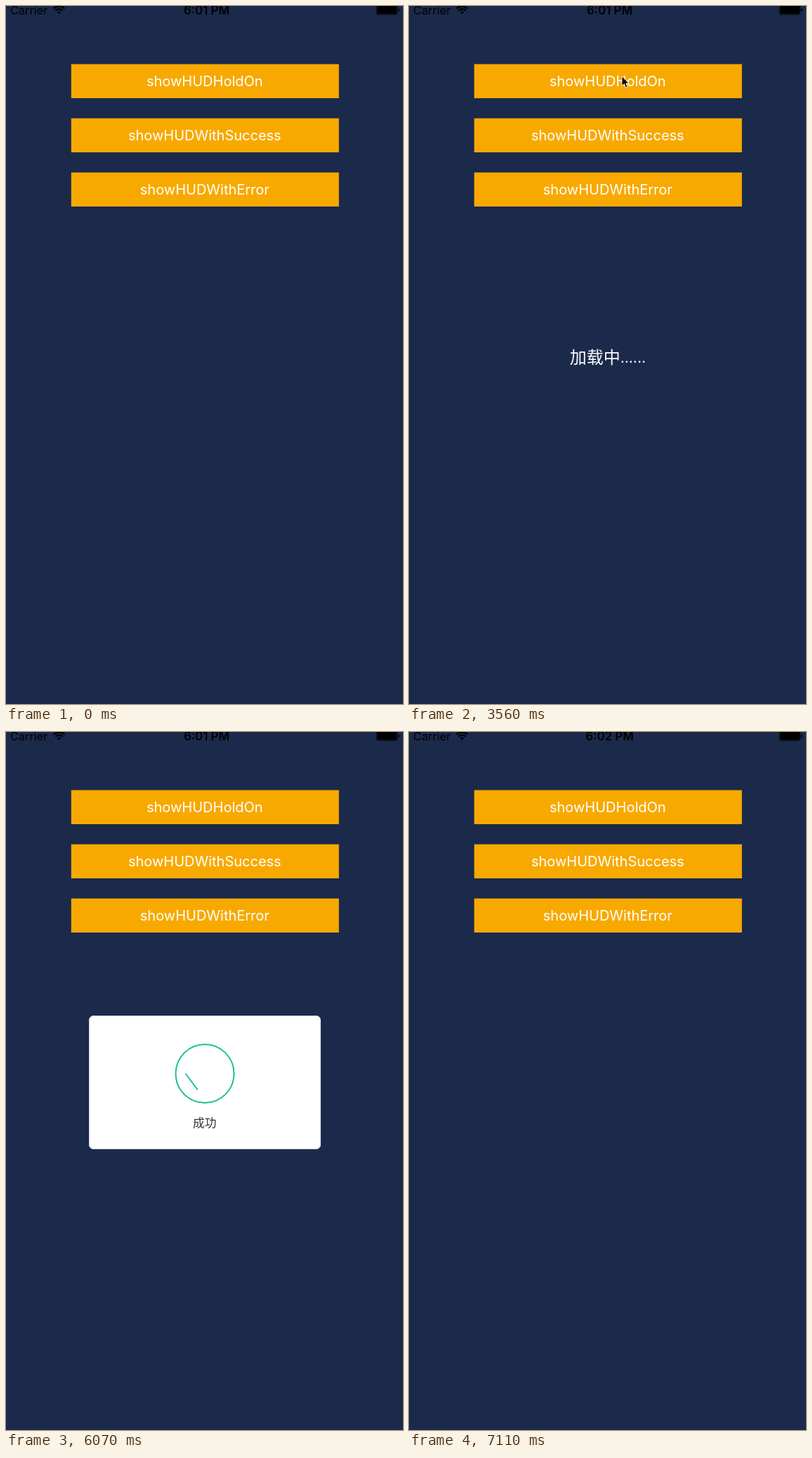
An HTML page for the animation above (7990 ms loop, 565 by 992 pixels).

```html
<!DOCTYPE html>
<html lang="en">
<head>
<meta charset="utf-8">
<title>HUD demo</title>
<style>
  html, body { margin: 0; height: 100%; overflow: hidden; background: #1b294b; }
  svg { display: block; width: 100vw; height: 100vh; }
  text { font-family: Inter, "Open Sans", sans-serif; }
  .cjk { font-family: "Noto Sans CJK SC", "Noto Sans CJK", sans-serif; }
  .button rect { fill: #f8a900; width: 381px; height: 48.4px; }
  .button text { fill: #fff; font-size: 20px; text-anchor: middle; }
  .status { font-size: 16.3px; }
  .line { fill: none; stroke: #1bbf98; stroke-width: 2; }
  #clock { font-size: 16.9px; font-weight: 600; text-anchor: middle; }
  #loading { fill: #fff; font-size: 24px; font-weight: 300; }
  #loading .dots { font-family: Inter, sans-serif; font-size: 21px; font-weight: 400; }
  #card .caption { fill: #333; font-size: 16.7px; font-weight: 500; text-anchor: middle; }
</style>
</head>
<body>
<svg viewBox="0 0 565 992" preserveAspectRatio="none">
  <text class="status" x="6" y="12">Carrier</text>
  <g fill="none" stroke="#000" stroke-width="2.3">
    <path d="M67.6 3.6a11.2 11.2 0 0 1 15.8 0"/>
    <path d="M70.4 6.5a7.2 7.2 0 0 1 10.2 0"/>
    <path d="M75.5 11.6l-2.8-2.8a4 4 0 0 1 5.6 0z" fill="#000" stroke="none"/>
  </g>
  <text id="clock" x="285.5" y="12">6:01 PM</text>
  <rect x="527.2" y="-3" width="29.8" height="15.2" rx="2" fill="none" stroke="#000" stroke-opacity=".7"/>
  <rect x="528.2" y="-2" width="27.8" height="13.2" rx="1"/>
  <path d="M558.2 3.2a2.6 2.6 0 0 1 0 5z"/>

  <g class="button" transform="translate(92.8 82.6)">
    <rect/><text id="hold" x="190" y="31.7">showHUDHoldOn</text>
  </g>
  <g class="button" transform="translate(92.8 159.6)">
    <rect/><text x="190" y="31.7">showHUDWithSuccess</text>
  </g>
  <g class="button" transform="translate(92.8 236.6)">
    <rect/><text x="190" y="31.7">showHUDWithError</text>
  </g>

  <text id="loading" class="cjk" x="228.7" y="508">加载中<tspan class="dots" dy="-.6">......</tspan></text>

  <g id="card">
    <rect x="118" y="403" width="330" height="190" rx="7" fill="#fff"/>
    <rect x="118.6" y="403.6" width="328.8" height="188.8" rx="6.4" fill="none" stroke="#dcdfe2" stroke-width="1.2"/>
    <path id="ring" class="line" pathLength="1" d="M283 444a41.5 41.5 0 0 1 0 83a41.5 41.5 0 0 1 0-83"/>
    <path id="tick" class="line" pathLength="1" d="M255.5 485.5L276 513L307 465.5"/>
    <text class="caption cjk" x="282.8" y="561.8">成功</text>
  </g>

  <path id="cursor" d="M0 0V14L3.2 11L5.4 16.2L7.8 15.2L5.6 10.2H10Z" stroke="#fff" stroke-width=".9"/>
</svg>
<script>
  const LOOP = 7990, BEATS = 54;
  const RING_SHARE = 0.74; // ring's part of the whole stroke
  // Moments in beats
  const ENTER = 6, ARRIVE = 11, PRESS = 17, RELEASE = 18, LEAVE = 22, GONE = 29;
  const LOAD = 19, SUCCESS = 33, FADE = 42, NEXT_MINUTE = 47;

  const $ = id => document.getElementById(id);
  const ramp = (t, from, to) => Math.max(0, Math.min(1, (t - from) / (to - from)));
  const smooth = u => u * u * (3 - 2 * u);

  // Sweep up to the button, drift a little left, then speed off to the right.
  function pointer(t) {
    const out = ramp(t, LEAVE, GONE);
    return {
      x: 526 - 209 * smooth(ramp(t, ENTER - 0.5, ARRIVE))
             - 17 * smooth(ramp(t, ARRIVE, ARRIVE + 4)) + 450 * out ** 4,
      y: 99.5 + 875 * (1 - ramp(t, ENTER, ARRIVE)) ** 4 + 480 * out ** 6
    };
  }

  function draw(id, part) {
    $(id).style.strokeDasharray = part + " 2";
  }

  function render(ms) {
    // The screen updates on a coarse beat, with a hard cut between beats.
    const beat = Math.floor(((ms + 4) % LOOP) / LOOP * BEATS);

    const { x, y } = pointer(beat);
    $("cursor").setAttribute("transform", `translate(${x} ${y})`);
    $("cursor").style.opacity = beat >= ENTER && beat < GONE ? 1 : 0;

    $("hold").style.opacity = beat < PRESS ? 1 : 0.2 + 0.8 * ramp(beat, RELEASE, RELEASE + 2.3);
    $("loading").style.opacity = beat >= LOAD && beat < SUCCESS ? 1 : 0;

    const alpha = beat < SUCCESS ? 0 : 1 - ramp(beat, FADE, FADE + 2.15);
    for (const part of $("card").children) part.style.opacity = beat < FADE + 2 ? alpha : 0;
    const done = ramp(beat, SUCCESS - 0.35, FADE + 0.8);
    draw("ring", ramp(done, 0, RING_SHARE));
    draw("tick", ramp(done, RING_SHARE, 1));

    $("clock").textContent = beat < NEXT_MINUTE ? "6:01 PM" : "6:02 PM";
  }

  const start = performance.now();
  function loop() {
    render(performance.now() - start);
    requestAnimationFrame(loop);
  }
  loop();
</script>
</body>
</html>
```
